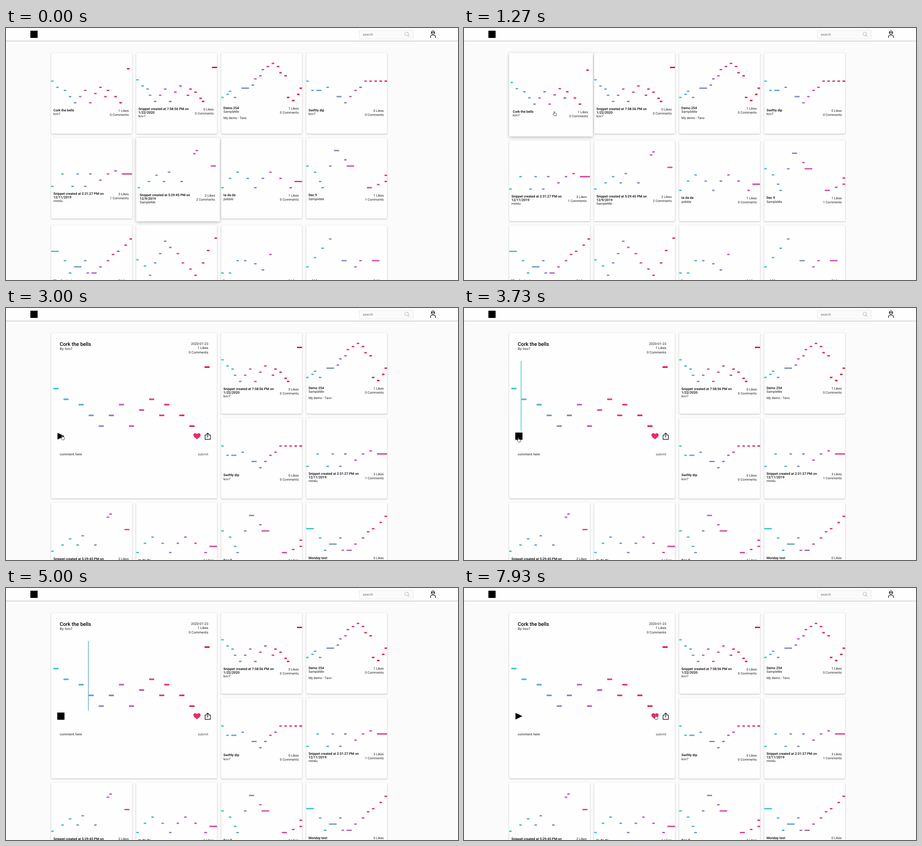
Recreate the animation shown at these times as an HTML page. Size 1001x559 px, loop 8000 ms.

```html
<!DOCTYPE html>
<html lang="en">
<head>
<meta charset="utf-8">
<title>Snippets</title>
<style>
  html, body { margin: 0; width: 100%; height: 100%; overflow: hidden; background: #fbfbfb; }
  svg { display: block; }
  text { font: 7.3px Roboto, sans-serif; fill: #222; text-rendering: geometricPrecision; }
  .title { font-size: 7.48px; font-weight: 500; fill: #000; }
  .end { text-anchor: end; }
  .big text { font-size: 7.6px; }
  .big .title { font-size: 11.3px; }
  .line { fill: none; stroke: #000; stroke-width: 1.2; stroke-linejoin: round; stroke-linecap: round; }
  .panel { fill: #fefefe; }
</style>
</head>
<body>
<svg width="1001" height="559" viewBox="0 0 1001 559">
  <g id="cards"></g>
  <g id="detail" class="big">
    <rect class="panel" x="100" y="55.5" width="367" height="367" rx="2" style="filter:drop-shadow(0 1px 1.5px #0004)"/>
    <text class="title" x="119" y="83.5">Cork the bells</text>
    <text x="119" y="93">By: kov7</text>
    <g class="end">
      <text x="448" y="81.6">2020-01-23</text>
      <text x="448" y="91.2">1 Likes</text>
      <text x="448" y="100.8">0 Comments</text>
      <text x="448" y="326.7" style="fill:#555">submit</text>
    </g>
    <text x="119" y="326.7">comment here</text>
    <g id="tune"></g>
    <rect id="playhead" y="117.5" width="1.5" height="154.5"/>
    <path id="play" d="M114 277L129.5 284.3L114 291.7Z"/>
    <rect id="stop" x="113.5" y="276.3" width="16" height="16"/>
    <path fill="#ea2b66" d="M423 291.2C419 287.8 415 285.5 415 281.8C415 277.4 421 276.4 423 280C425 276.4 431 277.4 431 281.8C431 285.5 427 287.8 423 291.2Z"/>
    <path class="line" d="M444 281.8H440.9V291.4H452.5V281.8H449.4M446.7 287V277.6M443.8 280.2L446.7 277.4L449.6 280.2"/>
  </g>
  <rect class="panel" width="1001" height="28" style="filter:drop-shadow(0 1px 1px #0004)"/>
  <rect x="54" y="6" width="16" height="16"/>
  <rect x="782.5" y="4.5" width="119" height="20" rx="1" fill="#fafafa" stroke="#e9e9e9"/>
  <text x="790" y="17.3" style="font-size:7.6px;fill:#757575">search</text>
  <path class="line" style="stroke:#aaa;stroke-width:1" d="M890.2 16.3L893.6 19.7M883.3 13.2a4 4 0 1 0 8 0a4 4 0 1 0 -8 0"/>
  <path class="line" d="M941.9 10.3a3.7 3.7 0 1 0 7.4 0a3.7 3.7 0 1 0 -7.4 0M942.2 9.6Q945.6 11.4 949 9.6M940.3 21.5V19.4Q940.3 16 943.6 16H947.6Q950.9 16 950.9 19.4V21.5"/>
  <path id="hand" fill="#fff" stroke="#333" stroke-width=".9" stroke-linejoin="round"
    d="M-1.9 1V-4Q-1.1 -5.4 -.3 -4V-1.2Q.7 -1.9 1.3 -.9Q2.3 -1.4 2.8 -.4Q4 -.7 4 .7V2.6L3 5H-1.4L-4.1 1.5Q-4.2 .1 -2.9 .4Z"/>
</svg>
<script>
const $ = id => document.getElementById(id);
const LOOP = 8000, OPEN = 1300, PLAY = 3254, STOP = 5700, HOVER = 520, HOVER_MS = 300;
const LEFT = 100, TOP = 55.5, PITCH = 188.3, SIZE = 179, PAD = 3, BEATS = 32;
const PALETTE = ['#42c8c8', '#7c93c5', '#da49ae', '#e62e6e', '#d9102c'];
const cards = [];

// Colour runs through the palette over fifteen notes, then back.
function noteColor(index) {
  const pos = (15 - Math.abs(15 - index)) / 15 * (PALETTE.length - 1);
  const k = Math.min(PALETTE.length - 2, Math.floor(pos));
  return `color-mix(in srgb, ${PALETTE[k + 1]} ${(pos - k) * 100}%, ${PALETTE[k]})`;
}

// Fills the legs between turning points [beat, pitch, length] with evenly
// spaced notes, snapped to the grid; held notes are reached in one leap.
function melody(spacing, turns) {
  const notes = [];
  let x = 0, y = 0;
  for (const [beat, pitch, length = 1] of turns) {
    const count = length > 1 ? 1 : Math.max(1, Math.round((beat - x) / spacing));
    for (let k = 1; k <= count; k++) {
      const f = k / count;
      notes.push({ beat: Math.round(x + (beat - x) * f), pitch: Math.round(y + (pitch - y) * f), length });
    }
    x = beat + length - 1;
    y = pitch;
  }
  return notes;
}

const drawNotes = (notes, x, floor, unit, rise, height) => notes.map((n, i) =>
  `<rect x="${x + n.beat * unit}" y="${floor - n.pitch * rise - height / 2}" width="${unit * n.length}" height="${height}" style="fill:${noteColor(i)}"/>`
).join('');

// top: middle of the first title line; the notes stand just above it
function addCard(title, user, likes, comments, top, notes, remark = '') {
  const lines = title.split('|');
  const label = (x, y, s, cls = '') => `<text class="${cls}" x="${x}" y="${y + 2.6}">${s}</text>`;
  const userY = top + (lines.length - 1) * 7.4 + 8.3;
  const g = document.createElementNS('http://www.w3.org/2000/svg', 'g');
  g.innerHTML = '<rect class="panel" rx="2"/><g>' +
    drawNotes(notes, 0, top - 16.6, SIZE / BEATS, 6.86, 3) +
    lines.map((s, i) => label(5, top + i * 7.4, s, 'title')).join('') +
    label(5, userY, user) + label(5, userY + 14, remark) +
    label(171.7, top + .8, likes + ' Likes', 'end') +
    label(171.7, top + 9.6, comments + ' Comments', 'end') + '</g>';
  $('cards').append(g);
  cards.push({ g, panel: g.firstChild, inner: g.lastChild });
}

const carol = [[0, 7], [9, 0], [13, 4], [15, 0], [19, 5], [21, 2], [22, 4], [27, 0]];
const hurried = carol.map(([beat, pitch]) => [30 * (beat / 30) ** 1.2, pitch]);
const mainTune = melody(2.1, [...carol, [30, 11]]);

addCard('Cork the bells', 'kov7', 1, 0, 127, mainTune);
addCard('Snippet created at 7:58:56 PM on|1/22/2020', 'kov7', 0, 0, 124, melody(2, [...hurried, [30, 11, 2]]));
addCard('Demo 254', 'SampleMe', 1, 0, 122,
  melody(1.6, [[0, 1], [3, 3], [5, 1], [8, 4, 3], [18, 11], [20, 12], [25, 8], [26, 1], [28, 0], [31, 4]]), 'My demo - Tavo');
addCard('Swiftly dip', 'kov7', 0, 0, 127,
  melody(2.1, [[0, 7], [2, 4], [4, 4, 2], [8, 5], [12, 2, 2], [15, 0], [23, 7], [31, 7]]));
addCard('Snippet created at 2:31:27 PM on|12/11/2019', 'mirelu', 3, 1, 124,
  melody(3, [[0, 0], [4, 4], [8, 0], [10, 4], [13, 0], [15, 4], [19, 2], [25, 5], [28, 4, 4]]));
addCard('Snippet created at 5:29:45 PM on|12/9/2019', 'SampleMe', 2, 2, 124,
  melody(3.4, [[0, 0], [7, 4], [10, 2], [12, 5], [17, 2], [22, 11], [23, 12], [29, 7, 2]]));
addCard('ta da da', 'pebble', 1, 0, 127,
  melody(4, [[0, 0], [6, 5], [13, 0], [19, 5], [27, 0], [29, 2, 3]]));
addCard('Dec 9', 'SampleMe', 1, 1, 127,
  melody(2.5, [[0, 7], [5, 2], [6, 0], [9, 7], [11, 12, 2], [15, 9], [16, 7, 3], [24, 0, 2], [31, 2], [31, 4]]));
addCard('Monday test', 'kov7', 0, 0, 122,
  melody(2.2, [[0, 7, 3], [5, 4], [7, 0], [9, 2, 3], [13, 4], [14, 0], [16, 0, 2], [31, 11]]));
addCard('Snippet', 'kov7', 0, 0, 127, melody(2.3, [[0, 5], [5, 0], [11, 11], [23, 0], [31, 12]]));
addCard('banana', 'pebble', 1, 0, 122, melody(3, [[0, 0], [3, 0], [6, 4], [9, 4], [16, 1], [19, 6]]));
addCard('pebble', 'pebble', 0, 0, 122, melody(3, [[0, 2], [9, 11], [14, 4, 2], [19, 2], [21, 4], [26, 4, 3]]));

const TUNE_X = 105, TUNE_UNIT = 357 / BEATS;
$('tune').innerHTML = drawNotes(mainTune, TUNE_X, 262, TUNE_UNIT, 11.9, 3.6);

const clamp = f => Math.min(1, Math.max(0, f));
const ease = f => f * f * (3 - 2 * f);

// Pointer routes: time, x, y. The pointer is hidden while idle.
const toPlay = [[250, 330, 300], [670, 207.5, 208.5], [1200, 201, 190], [2000, 205.5, 183], [3150, 121.5, 292.5], [4000, 121.5, 292.5]];
const toHeart = [[7300, 330, 330], [7780, 425.5, 286.5], [LOOP, 425.5, 286.5]];

function pointerAt(t, route) {
  const k = route.findIndex(p => p[0] > t);
  if (k < 1) return null;
  const a = route[k - 1], b = route[k], f = ease((t - a[0]) / (b[0] - a[0]));
  return [a[1] + (b[1] - a[1]) * f, a[2] + (b[2] - a[2]) * f];
}

function layout(t) {
  const open = t >= OPEN, p = ease(clamp((t - HOVER) / HOVER_MS));
  cards.forEach(({ g, panel, inner }, i) => {
    let col = i % 4, row = i >> 2, hover = 0, shift = 0;
    if (open) {
      // The opened card takes two by two cells; the rest flow around it.
      col = i < 5 ? 2 + (i - 1) % 2 : (i - 5) % 4;
      row = i < 5 ? (i - 1) >> 1 : 2 + ((i - 5) >> 2);
    } else {
      hover = i == 0 ? p : i == 5 ? 1 - p : 0;
      shift = 2 * PAD * (row == 0 ? 0 : row == 1 ? p : 1);
    }
    g.style.display = open && i == 0 ? 'none' : '';
    g.setAttribute('transform', `translate(${LEFT + col * PITCH} ${TOP + row * PITCH + shift})`);
    panel.setAttribute('width', SIZE + 2 * PAD * hover);
    panel.setAttribute('height', SIZE + 2 * PAD * hover);
    panel.style.filter = `drop-shadow(0 ${1 + hover}px ${1.5 + 2 * hover}px #0004)`;
    inner.setAttribute('transform', `translate(${PAD * hover} ${PAD * hover})`);
  });
  $('detail').style.display = open ? '' : 'none';
}

function draw(now) {
  const t = now % LOOP;
  layout(t);

  const playing = t >= PLAY && t < STOP;
  const x = TUNE_X + (t - PLAY) * .0441;
  const current = mainTune.filter(n => TUNE_X + n.beat * TUNE_UNIT <= x).length - 1;
  $('play').style.display = playing ? 'none' : '';
  $('stop').style.display = $('playhead').style.display = playing ? '' : 'none';
  $('playhead').setAttribute('x', x - .3);
  $('playhead').style.fill = noteColor(Math.max(0, current));

  const pos = pointerAt(t, toPlay) || pointerAt(t, toHeart);
  $('hand').style.display = pos ? '' : 'none';
  if (pos) $('hand').setAttribute('transform', `translate(${pos})`);
  requestAnimationFrame(draw);
}
requestAnimationFrame(draw);
</script>
</body>
</html>
```
